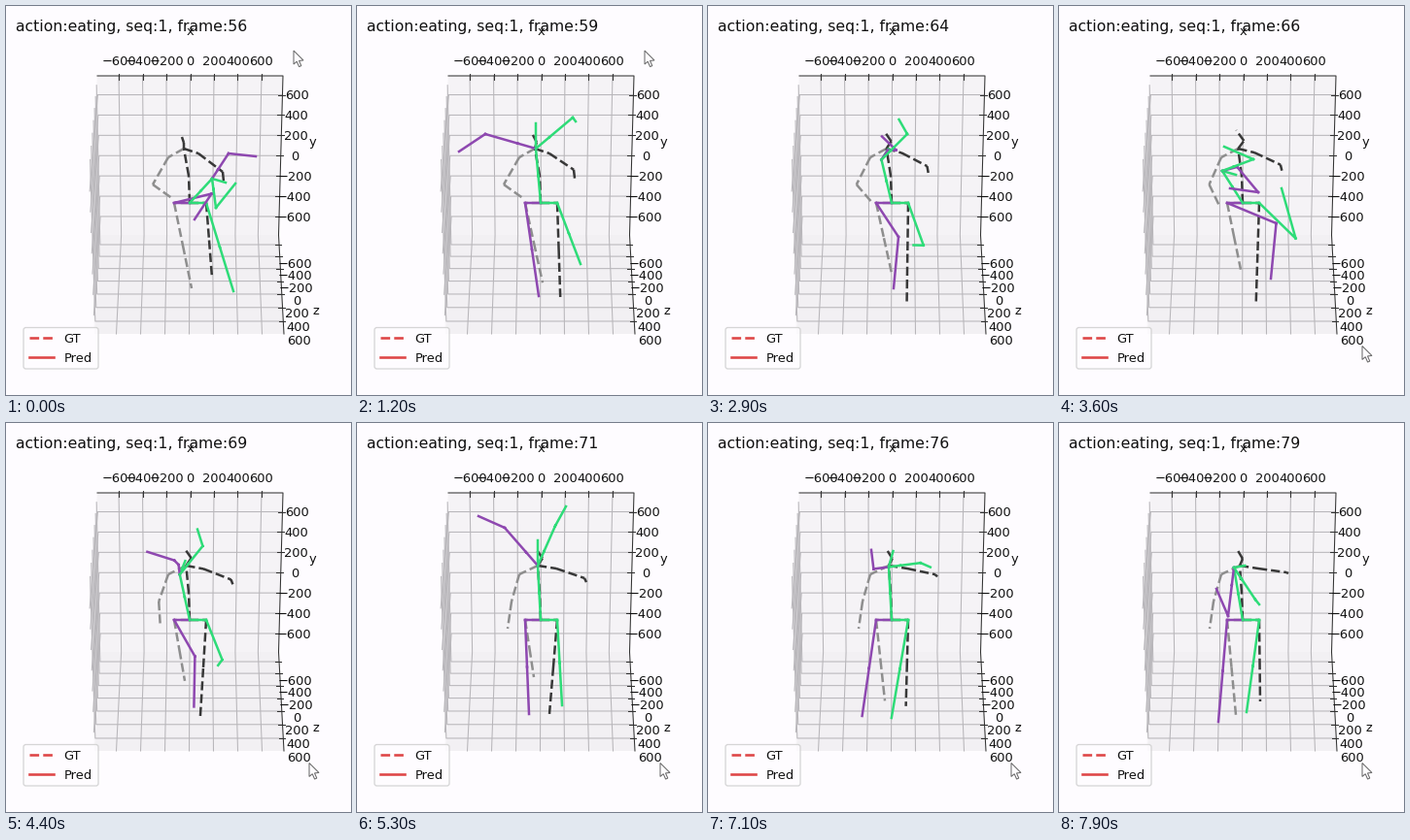
A matplotlib script that plays this animation: 355 by 401 pixels, repeating every 8 s.

```python
import numpy as np
import matplotlib.pyplot as plt
from matplotlib.animation import FuncAnimation
from matplotlib.patches import FancyBboxPatch, Polygon

W, H, DPI = 355, 401, 64
PT = 72 / DPI                      # points per pixel
STEP, FRAMES = 100, 80
FIRST, START, HOLD = 56, 230, 347  # first count, first change, ms per count

PAPER, INK, AXIS = "#fefcff", "#111111", "#333333"
GREY, DARK, PURPLE, GREEN, RED = "#8e8e8e", "#383838", "#8e48b0", "#2edc78", "#de4647"

plt.rcParams["font.family"] = "DejaVu Sans"
fig = plt.figure(figsize=(W / DPI, H / DPI), dpi=DPI, facecolor=PAPER)
ax = fig.add_axes([0, 0, 1, 1])
ax.set(xlim=(0, W), ylim=(H, 0))
ax.axis("off")


def label(x, y, s, size=13.04, ha="center"):
    """Text with its baseline at y, sizes in pixels."""
    return ax.text(x, y, s, color=INK, fontsize=size * PT, ha=ha,
                   va="baseline", zorder=6)


def stroke(pts, color, width, **kw):
    x, y = np.array(pts, float).T
    return ax.plot(x, y, color=color, lw=width * PT, **kw)[0]


def mix(a, b, f):
    return np.add(a, np.multiply(np.subtract(b, a), f))


# ---- box of the 3D axes: back wall, floor and left wall ----
TL, TR = (94, 72), (285, 72)
ML, MR = (97.5, 236), (280.5, 236)
BL, BR = (91, 338), (286, 338)
OUT = (85.5, 171)
TICKS = np.arange(-600, 601, 200)
k = np.arange(7)
fx = (TICKS + 780) / 1560
fy = np.linspace(0.884, 0.119, 7)
fz = 0.098 + 0.1167 * k + 0.00206 * k ** 2

for quad, shade in (((TL, TR, MR, ML), "#f5f3f6"),
                    ((ML, MR, BR, BL), "#f2f0f3"),
                    ((TL, ML, BL, OUT), "#f6f4f7")):
    ax.add_patch(Polygon(quad, facecolor=shade, edgecolor="none", zorder=0))


def grid(f, *edges):
    """Line through the same fraction of several edges."""
    stroke([mix(a, b, f) for a, b in edges], "#b8b6ba", 1.05, zorder=1)


for gx, gy, gz in zip(fx, fy, fz):
    grid(gx, (TL, TR), (ML, MR), (BL, BR))
    grid(gy, (OUT, BL), (TL, ML), (TR, MR))
    grid(gz, (TL, OUT), (ML, BL), (MR, BR))
stroke([TL, TR, MR, BR], AXIS, 1.05, zorder=2)


def scale(a, b, fractions, mark, place):
    """Tick marks and numbers along one edge."""
    for v, f in zip(TICKS, fractions):
        p = mix(a, b, f)
        stroke([p - np.multiply(mark, 2), p + mark], AXIS, 1.05, zorder=2)
        label(*(p + place), str(v).replace("-", "\u2212"))


scale(TL, TR, fx, (0, -2.2), (0, -11))
scale(TR, MR, fy, (2.2, 0), (15, 4.8))
scale(MR, BR, fz, (2.2, 0), (16, 24.3))
label(189, 30, "x")
label(315, 144, "y")
label(318.5, 317.5, "z")
title = label(10.4, 26, "", 15.65, "left")

# ---- legend ----
ax.add_patch(FancyBboxPatch((20.5, 334), 72, 37.5,
                            boxstyle="round,pad=2.5,rounding_size=2.5",
                            facecolor=PAPER, edgecolor="#cccccc", lw=1.3 * PT,
                            alpha=0.8, zorder=5))
for y, ls, name in ((342, "--", "GT"), (362, "-", "Pred")):
    stroke([(24, y), (49, y)], RED, 2.6, ls=ls, zorder=6)
    label(59.5, y + 4.6, name, ha="left")

# ---- skeletons: every joint is an array of places, one per count ----
n = np.arange(24)
KEYS = [0, 3, 6, 10, 15, 18, 23]


def ramp(at, values):
    return np.interp(n, at, values)


def joint(x, y):
    return np.stack([x + 0.0 * n, y + 0.0 * n], axis=1)


def keyed(*pts):
    """Straight moves between the key poses."""
    xs, ys = zip(*pts)
    return joint(ramp(KEYS, xs), ramp(KEYS, ys))


def shift(dx, dy, amount=1):
    return joint(dx * amount, dy * amount)


def middle(a, b):
    return mix(a, b, 0.5)


pelvis, hip_l, hip_r = joint(189, 203), joint(173, 203), joint(206, 203)

# ground truth: slow drifts
drift = n / 23
turn = ramp([6, 15], [0, 1])
gt_neck = joint(183 + 3 * turn, 147)
lift = ramp([0, 10, 23], [0, 1, 0.5])
gt_face = gt_neck + shift(0, -6) + shift(6, -2, lift)
gt_crown = gt_neck + shift(-2, -12) + shift(0, -7, lift)
gt_elbow_l = joint(151 + 8 * turn, 184)
gt_wrist_l = joint(172 - 17 * turn, 199 + 13 * turn)
gt_shoulder_r = joint(198 + 7 * turn, 152 - 2 * turn)
gt_elbow_r = joint(223 + 11 * turn, 171 - 17 * drift)
gt_wrist_r = joint(224 + 12 * turn, 181 - 26 * drift)
gt_foot_l = joint(191 - 9 * turn, ramp([0, 15, 23], [291, 262, 301]))
gt_foot_r = joint(ramp([0, 15, 23], [212, 198, 207]),
                  ramp([0, 3, 6, 10, 23], [280, 300, 308, 308, 287]))

# prediction: end joints move freely, the rest follows
fold = ramp([0, 3, 6, 10, 15], [1, 0, 0, 1, 0])
nod = fold + ramp([18, 23], [0, 0.8])
neck = keyed((212, 178), (184, 147), (189, 147), (168, 170), (186, 147), (190, 148), (180, 149))
crown = neck + shift(0, -26) + shift(14, 30, nod)
foot_l = keyed((194, 220), (187, 299), (164, 301), (218, 281), (177, 300), (155, 298), (164, 308))
foot_r = keyed((234, 294), (230, 266), (194, 305), (229, 188), (211, 291), (186, 308), (193, 298))
knee_l = middle(hip_l, foot_l) + shift(28, -18, fold)
knee_r = middle(hip_r, foot_r) + shift(26, 44, fold * (n > 6))
elbow_l = keyed((229, 152), (132, 132), (182, 105), (205, 192), (152, 108), (168, 118), (174, 199))
wrist_l = keyed((257, 155), (105, 150), (182, 81), (176, 188), (125, 96), (172, 104), (162, 171))
elbow_r = keyed((216, 208), (222, 115), (210, 106), (200, 158), (204, 106), (230, 119), (202, 182))
wrist_r = keyed((236, 183), (225, 119), (223, 89), (170, 145), (215, 86), (244, 123), (206, 187))
shoulder_l = mix(neck, elbow_l, 0.36) + shift(2, -12, fold * (n > 6))
shoulder_r = mix(neck, elbow_r, 0.36)

LIMBS = [
    (GREY, "--", pelvis, hip_l, middle(hip_l, gt_foot_l), gt_foot_l),
    (GREY, "--", gt_neck, joint(167, 156), gt_elbow_l, gt_wrist_l),
    (DARK, "--", pelvis, hip_r, middle(hip_r, gt_foot_r), gt_foot_r),
    (DARK, "--", pelvis, joint(188, 175), gt_neck, gt_face, gt_crown),
    (DARK, "--", gt_neck, gt_shoulder_r, gt_elbow_r, gt_wrist_r),
    (GREEN, "-", pelvis, hip_r, knee_r, foot_r),
    (PURPLE, "-", pelvis, hip_l, knee_l, foot_l),
    (GREEN, "-", pelvis, middle(pelvis, neck), neck, crown),
    (PURPLE, "-", neck, shoulder_l, elbow_l, wrist_l),
    (GREEN, "-", neck, shoulder_r, elbow_r, wrist_r),
]
paths = [np.stack(joints, axis=1) for _, _, *joints in LIMBS]
lines = [stroke([(0, 0)], color, 2.5, ls=ls, zorder=4) for color, ls, *_ in LIMBS]


def bones(joints):
    """Separate segments, so dashes restart at each joint."""
    gap = np.full(2, np.nan)
    return np.array([p for a, b in zip(joints, joints[1:]) for p in (a, b, gap)])


# ---- mouse pointer ----
ARROW = np.array([(0, 0), (0, 14), (3.2, 11.2), (5.6, 16.6), (7.8, 15.6),
                  (5.5, 10.4), (10, 10)])
pointer = ax.add_patch(Polygon(ARROW, facecolor=PAPER, edgecolor="#666666",
                               lw=PT, zorder=8))


def place_pointer(t):
    back = t >= 3200
    pointer.set_visible(back or t <= 1500)
    away = mix((296, 46), (340, 345), np.clip((t - 1200) / 300, 0, 1))
    pointer.set_xy(ARROW + ((312, 350.5) if back else away))


def update(i):
    t = i * STEP
    count = max(0, 1 + (t - START) // HOLD)
    title.set_text(f"action:eating, seq:1, frame:{FIRST + count}")
    for line, path in zip(lines, paths):
        line.set_data(*bones(path[count]).T)
    place_pointer(t)
    return [title, pointer, *lines]


anim = FuncAnimation(fig, update, frames=FRAMES, interval=STEP,
                     init_func=lambda: update(0), repeat=True, repeat_delay=0)
plt.show()
```
